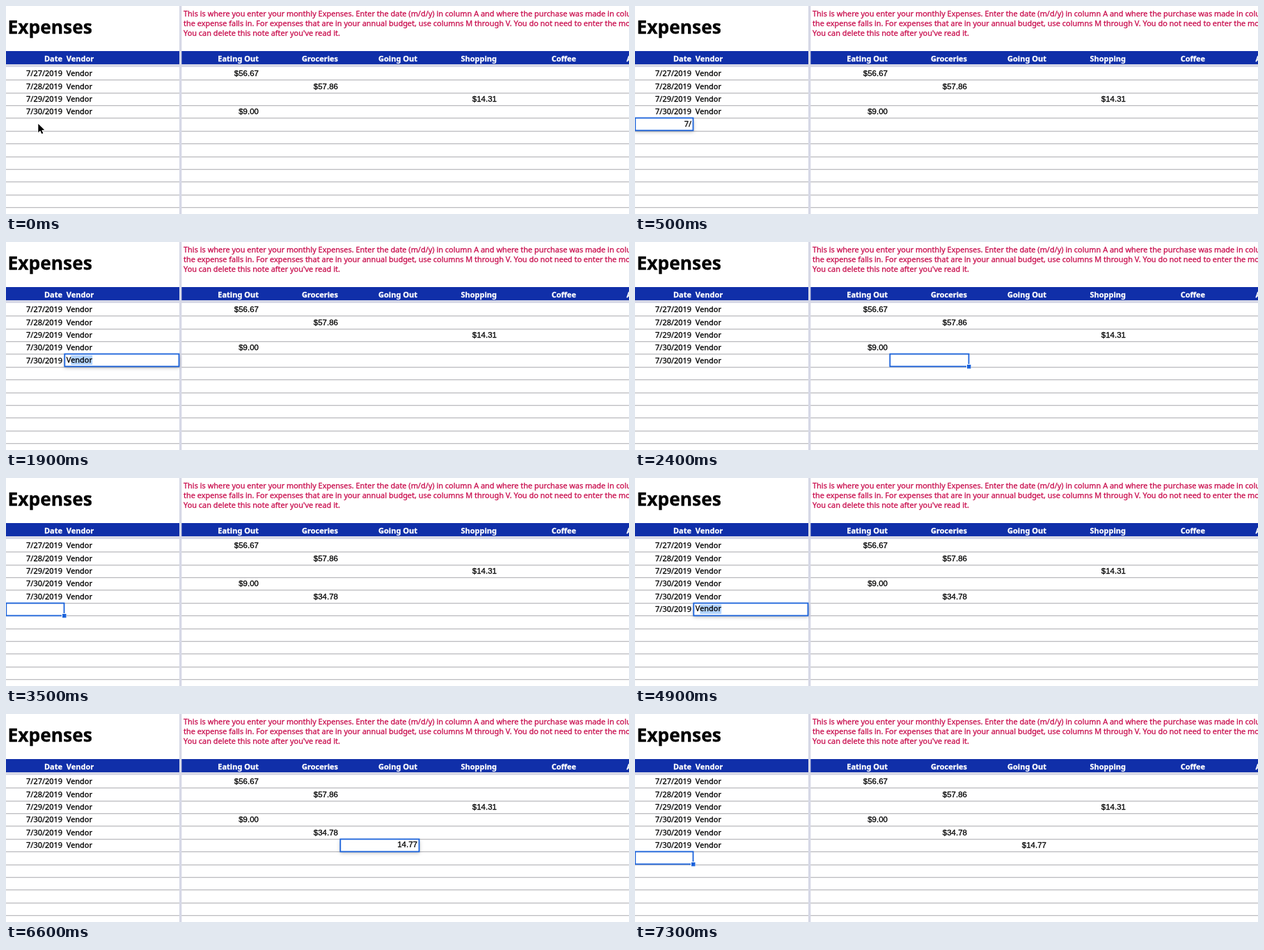
Write an HTML page with a canvas that moves like this. It is 895x300 px and loops after 7700 ms.

```html
<!DOCTYPE html>
<html lang="en">
<head>
<meta charset="utf-8">
<title>Expenses sheet</title>
<style>
  html, body { margin: 0; width: 100%; height: 100%; overflow: hidden; background: #fff; }
  canvas { display: block; }
</style>
</head>
<body>
<canvas id="stage" width="895" height="300"></canvas>
<script>
const W = 895, H = 300, LOOP = 7700;
const ctx = document.getElementById('stage').getContext('2d');

const NOTO = '"Noto Sans", "Open Sans", sans-serif';
const BODY = `10.95px ${NOTO}`;
const BOLD = `bold 11px ${NOTO}`;
const TITLE = `bold 26.4px ${NOTO}`;
const MONEY = '11.5px "Liberation Sans", Arial, sans-serif';

const BLUE = '#1a62db', HEADER = '#102fa9', GRID = '#bcbcc0', FREEZE = '#d6d8e6';
const ROW_H = 18.4, FIRST_ROW = 87.7;
const EDGES = [0, 84, 249, 366, 480, 594, 708, 822, 936];

const NOTE = [
  'This is where you enter your monthly Expenses. Enter the date (m/d/y) in column A and where the purchase was made in column',
  'the expense falls in. For expenses that are in your annual budget, use columns M through V. You do not need to enter the month',
  "You can delete this note after you've read it."
];
const HEADINGS = ['Date', 'Vendor', 'Eating Out', 'Groceries', 'Going Out', 'Shopping', 'Coffee'];

// Cell contents: column, row, text, time of entry
const CELLS = [
  [0, 0, '7/27/2019', 0], [1, 0, 'Vendor', 0], [2, 0, '$56.67', 0],
  [0, 1, '7/28/2019', 0], [1, 1, 'Vendor', 0], [3, 1, '$57.86', 0],
  [0, 2, '7/29/2019', 0], [1, 2, 'Vendor', 0], [5, 2, '$14.31', 0],
  [0, 3, '7/30/2019', 0], [1, 3, 'Vendor', 0], [2, 3, '$9.00', 0],
  [0, 4, '7/30/2019', 900], [1, 4, 'Vendor', 2200], [3, 4, '$34.78', 3200],
  [0, 5, '7/30/2019', 4600], [1, 5, 'Vendor', 5500], [4, 5, '$14.77', 6900]
];

// Active cell over time: start, column, row, text being typed
const STEPS = [
  [100, 0, 4], [400, 0, 4, '7'], [500, 0, 4, '7/'], [600, 0, 4, '7/3'], [700, 0, 4, '7/30'],
  [900, 1, 4], [1600, 1, 4, 'V'], [2200, 2, 4],
  [2400, 3, 4], [2800, 3, 4, '3'], [2900, 3, 4, '34.'], [3000, 3, 4, '34.78'],
  [3200, 0, 5], [4000, 0, 5, '7'], [4100, 0, 5, '7/'], [4200, 0, 5, '7/3'], [4300, 0, 5, '7/30'],
  [4600, 1, 5], [4900, 1, 5, 'V'], [5500, 2, 5], [5600, 3, 5],
  [5700, 4, 5], [6300, 4, 5, '1'], [6400, 4, 5, '14'], [6500, 4, 5, '14.7'], [6600, 4, 5, '14.77'],
  [6900, 0, 6]
];
const POINTER_HIDES = 400;

const rowTop = row => Math.round(FIRST_ROW + row * ROW_H);
const baseline = row => 101.4 + row * 18.35;
const cellFont = col => col < 2 ? BODY : MONEY;

function rect(x, y, w, h, color) {
  ctx.fillStyle = color;
  ctx.fillRect(x, y, w, h);
}

// A hairline outline gives the text its slightly heavy rendering.
function text(str, x, y, font, color = '#000', align = 'left') {
  ctx.font = font;
  ctx.fillStyle = ctx.strokeStyle = color;
  ctx.textAlign = align;
  ctx.lineWidth = 0.3;
  ctx.lineJoin = 'round';
  ctx.fillText(str, x, y);
  ctx.strokeText(str, x, y);
}

function cellText(str, col, y, font, color) {
  if (col === 1) text(str, EDGES[1] + 2.8, y, font, color);
  else text(str, EDGES[col + 1] - 3, y, font, color, 'right');
}

function drawSheet(t) {
  rect(0, 0, W, H, '#fff');
  text('Expenses', 2.4, 39.5, TITLE);
  NOTE.forEach((line, i) => text(line, 255, 14.5 + i * 14.1, BODY, '#c9104f'));

  for (let row = 1; row < 12; row++) rect(0, rowTop(row), W, 1.3, GRID);
  rect(0, 65, W, 19, HEADER);
  rect(0, 84, W, 4, FREEZE);
  rect(249, 0, 3.4, H, FREEZE);

  HEADINGS.forEach((name, col) => cellText(name, col, 79.5, BOLD, '#fff'));
  text('A', 891.5, 79.5, BOLD, '#fff');

  for (const [col, row, str, start] of CELLS) {
    if (t >= start) cellText(str, col, baseline(row), cellFont(col));
  }
}

function drawEditor(col, row, typed, x, y, w, h) {
  ctx.save();
  ctx.shadowColor = 'rgba(60,64,67,.35)';
  ctx.shadowBlur = 5;
  ctx.shadowOffsetY = 2;
  rect(x, y, w, h, '#fff');
  ctx.restore();

  if (col === 1) {
    ctx.font = BODY;
    const start = EDGES[1] + 2.8 + ctx.measureText('V').width;
    rect(start, y + 2, ctx.measureText('endor').width, 13.5, '#b3d4fd');
    typed = 'Vendor';
  }
  cellText(typed, col, baseline(row) - 0.7, cellFont(col));
}

function drawActive([, col, row, typed]) {
  const x = EDGES[col] + (col === 2 ? 3 : 0);
  const y = rowTop(row) + 0.5;
  const right = EDGES[col + 1];
  const w = right - x, h = 18;

  if (typed) drawEditor(col, row, typed, x, y, w, h);
  ctx.strokeStyle = BLUE;
  ctx.lineWidth = 1.8;
  ctx.lineJoin = 'miter';
  ctx.strokeRect(x + 0.3, y, w - 0.8, h);
  if (!typed) {
    rect(right - 4, y + h - 3.5, 7, 7, '#fff');
    rect(right - 3, y + h - 2.5, 5.5, 5.5, BLUE);
  }
}

function drawPointer(x, y) {
  const points = [[0, 0], [0, 12.5], [2.9, 9.8], [5, 14.3], [7, 13.4], [5, 9], [8.9, 8.8]];
  ctx.beginPath();
  points.forEach(([dx, dy]) => ctx.lineTo(x + dx, y + dy));
  ctx.closePath();
  ctx.lineJoin = 'round';
  ctx.strokeStyle = '#fff';
  ctx.lineWidth = 2;
  ctx.stroke();
  ctx.fillStyle = '#000';
  ctx.fill();
}

function draw() {
  const t = (performance.now() - startTime) % LOOP;
  drawSheet(t);
  const active = STEPS.filter(step => step[0] <= t).pop();
  if (active) drawActive(active);
  if (t < POINTER_HIDES) drawPointer(46.3, 170);
  requestAnimationFrame(draw);
}

const startTime = performance.now();
draw();
</script>
</body>
</html>
```
